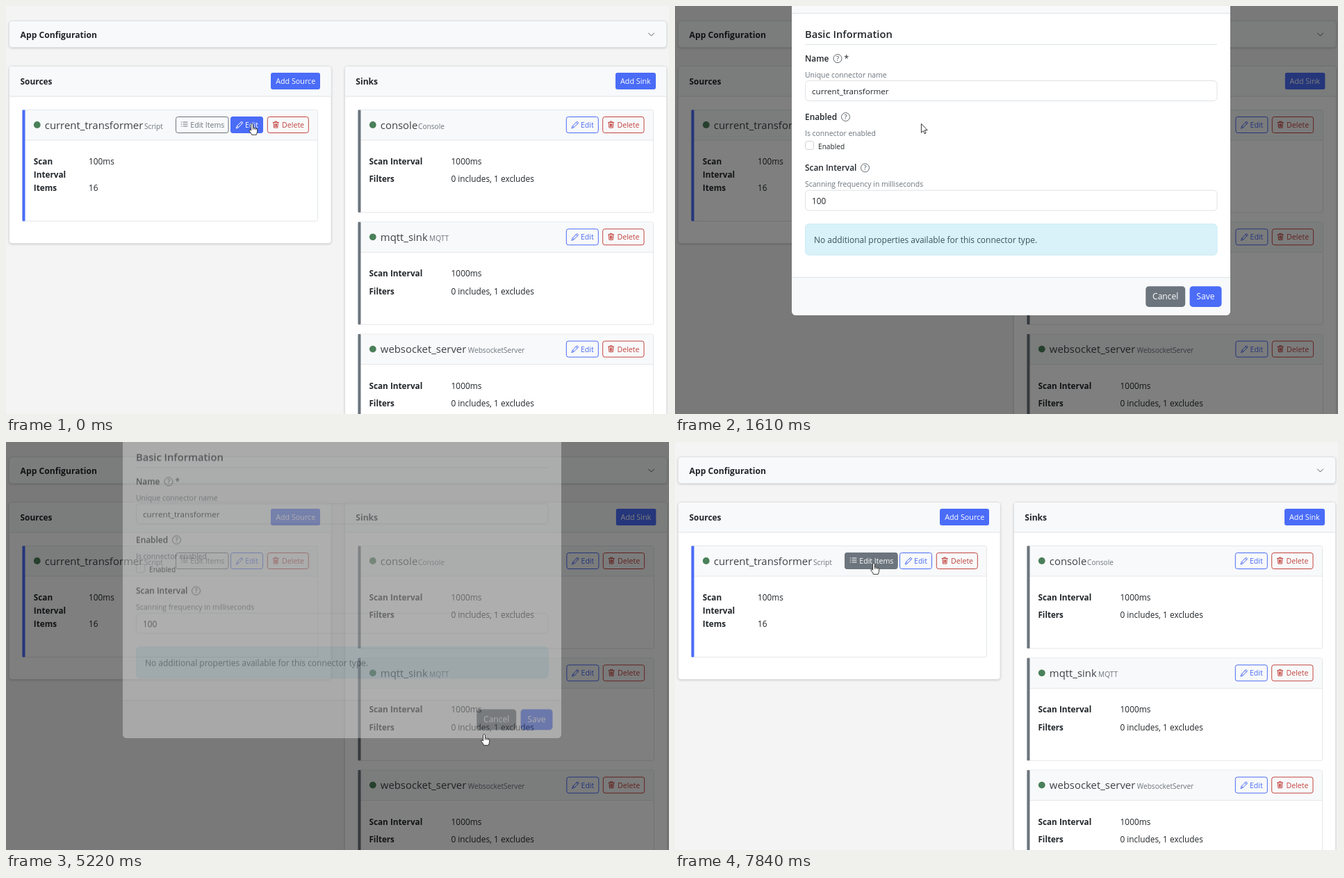
An HTML page for the animation above (8000 ms loop, 954 by 587 pixels).

```html
<!DOCTYPE html>
<html lang="en">
<head>
<meta charset="utf-8">
<title>Connector settings</title>
<style>
html, body { margin: 0; width: 100%; height: 100%; overflow: hidden; background: #f4f4f4; }
svg { display: block; width: 954px; height: 587px; font-family: "Open Sans", "Noto Sans", sans-serif; }
text { fill: #212529; }
.b { font-weight: 700; }
.sb { font-weight: 600; }
.title { font-weight: 500; fill: #3d4246; }
.mute { fill: #6c757d; }
.white { fill: #fff; }
.shadow { filter: drop-shadow(0 1.5px 1.5px rgba(0, 0, 0, .16)); }
.line { fill: none; stroke-width: 1; stroke-linecap: round; stroke-linejoin: round; }

/* every change is held until the next one */
.wide, .nudge, #shade, #modal, #editOn, #itemsOn, #cancelOn, #spin, #cursor, #arrow, #hand {
  animation: 8s step-end infinite;
}
.wide { width: var(--w); animation-name: wide; }
.nudge { animation-name: nudge; }
#shade { animation-name: shade; }
#modal { animation-name: modal; }
#editOn { animation-name: edit; }
#itemsOn { animation-name: items; }
#cancelOn { animation-name: cancel; }
#spin { animation-name: spin; }
#cursor { animation-name: travel; }
#arrow { animation-name: arrow; }
#hand { animation-name: hand; }

@keyframes wide {
  0%, 70.3%, 100% { width: var(--w); }
  14.9% { width: calc(var(--w) + .8px); }
}
@keyframes nudge {
  0%, 70.3%, 100% { transform: none; }
  14.9% { transform: translateX(.6px); }
}
@keyframes shade {
  0%, 70.3%, 100% { opacity: 0; }
  14.9% { opacity: .2; }
  17.6% { opacity: .5; }
  67.7% { opacity: .025; }
}
@keyframes modal {
  0%, 67.7%, 100% { opacity: 0; transform: translateY(-40px); }
  17.6% { opacity: .74; transform: translateY(-18.7px); }
  20.1% { opacity: 1; transform: none; }
  65.2% { opacity: .37; transform: translateY(-18.7px); }
}
@keyframes edit {
  0% { opacity: 1; filter: none; }
  12.5% { opacity: 1; filter: brightness(.9); }
  14.9% { opacity: .6; filter: none; }
  17.6%, 100% { opacity: 0; filter: none; }
}
@keyframes items {
  0% { opacity: 0; }
  92.9%, 100% { opacity: 1; }
}
@keyframes cancel {
  0%, 65.2%, 100% { opacity: 0; }
  52.7% { opacity: .6; }
  55.2% { opacity: 1; }
}
@keyframes spin {
  0%, 45.1%, 100% { opacity: 0; }
  30.1% { opacity: 1; }
}
@keyframes travel {
  0% { transform: translate(354px, 169px); }
  22.6% { transform: translate(450px, 181px); }
  25.1% { transform: translate(544px, 193px); }
  27.6% { transform: translate(563px, 210px); }
  30.1% { transform: translate(578px, 224px); }
  37.6% { transform: translate(600px, 238px); }
  40.1% { transform: translate(613px, 258px); }
  42.6% { transform: translate(630px, 285px); }
  45.1% { transform: translate(650px, 322px); }
  47.6% { transform: translate(668px, 358px); }
  50.1% { transform: translate(682px, 385px); }
  52.7% { transform: translate(685px, 405px); }
  55.2% { transform: translate(687px, 415px); }
  57.7% { transform: translate(688px, 420px); }
  75.3% { transform: translate(650px, 400px); }
  77.8% { transform: translate(570px, 358px); }
  80.4% { transform: translate(480px, 308px); }
  82.9% { transform: translate(400px, 261px); }
  85.4% { transform: translate(335px, 221px); }
  87.9% { transform: translate(300px, 199px); }
  90.4% { transform: translate(292px, 186px); }
  92.9% { transform: translate(288px, 178px); }
  95.4%, 100% { transform: translate(286px, 174px); }
}
@keyframes arrow {
  0%, 52.7%, 92.9%, 100% { opacity: 0; }
  14.9%, 75.3% { opacity: 1; }
}
@keyframes hand {
  0%, 52.7%, 92.9%, 100% { opacity: 1; }
  14.9%, 75.3% { opacity: 0; }
}
</style>
</head>
<body>
<svg id="stage" viewBox="0 0 954 587"></svg>
<script>
const BLUE = '#4a6cf7', GRAY = '#6c757d', RED = '#c2453f', PALE = '#f8f9fa', EDGE = '#dfe1e3';

const text = (x, y, s, size, cls = '') =>
  `<text x="${x}" y="${y}" font-size="${size}" class="${cls}">${s}</text>`;

const rect = (x, y, w, h, fill, stroke = 'none', r = 0, cls = '') =>
  `<rect x="${x}" y="${y}" width="${w}" height="${h}" rx="${r}" fill="${fill}" stroke="${stroke}"
    class="${cls}" style="--w:${w}px"/>`;

const path = (d, colour, extra = '') =>
  `<path class="line" d="${d}" stroke="${colour}" ${extra}/>`;

const icons = {
  list: 'M.7 1.5h.6M.7 4.5h.6M.7 7.5h.6M3.5 1.5h6M3.5 4.5h6M3.5 7.5h6',
  pencil: 'M.6 10.2L1.8 7 8.2.6 10.2 2.6 3.8 9ZM6.8 2L8.8 4M1.8 7L3.8 9',
  trash: 'M.6 2h8.2M3.2 1.8V.6h3V1.8M1.5 2.2L2 9.6H7.4L7.9 2.2M3.5 4V8M4.7 4V8M5.9 4V8'
};

// Small outlined button, or filled when `on` is set
function button(x, w, y, label, icon, colour, on = false) {
  const ink = on ? '#fff' : colour;
  const gap = icon === 'list' ? 7 : 7.2;
  return rect(x, y, w, 23, on ? colour : 'none', colour, 3) +
    `<g transform="translate(${x + gap} ${y + 6})">${path(icons[icon], ink)}</g>` +
    `<text x="${x + (icon === 'pencil' ? 20.6 : 20.8)}" y="${y + 15.6}" font-size="10.6" style="fill:${ink}">${label}</text>`;
}

const solid = (x, y, w, h, label, size, pad, fill, r) =>
  rect(x, y, w, h, fill, 'none', r) + text(x + pad, y + h / 2 + size * .36, label, size, 'white');

// Connector card: accent bar, pale heading strip, dot and names
function card(x, y, h, accent, name, kind, kindX, cls) {
  return rect(x, y, 425, h, '#fff', '#e4e6e8', 2, cls) +
    rect(x + .5, y + .5, 424, 42.5, PALE, 'none', 0, cls) +
    rect(x + .5, y + 43, 424, 1, '#e4e6e8', 'none', 0, cls) +
    rect(x, y, 4, h, accent, 'none', 1) +
    `<circle cx="${x + 21.3}" cy="${y + 21.5}" r="4.9" fill="#4a8059"/>` +
    text(x + 32.3, y + 27.3, name, 14.9, 'title') +
    text(kindX, y + 27.3, kind, 10.15, 'mute');
}

function panel(x, y, w, h, cls = '') {
  return `<g class="shadow">${rect(x, y, w, h, '#fff', EDGE, 4, cls)}</g>` +
    rect(x + .5, y + .5, w - 1, 43, PALE, 'none', 3.5, cls) +
    rect(x + .5, y + 43, w - 1, 1, EDGE, 'none', 0, cls);
}

function sink(i, name, kind, kindX) {
  const x = 506.5, y = 149.5 + i * 161.3;
  return card(x, y, 147.5, GRAY, name, kind, kindX, 'wide') +
    `<g class="nudge">${button(806.3, 46, y + 10, 'Edit', 'pencil', BLUE)}
     ${button(858.7, 59.3, y + 10, 'Delete', 'trash', RED)}</g>` +
    text(522.5, y + 78.4, 'Scan Interval', 11.75, 'b') + text(640.6, y + 78.4, '1000ms', 11.85) +
    text(522.5, y + 103.8, 'Filters', 11.6, 'b') + text(640.4, y + 103.8, '0 includes, 1 excludes', 11.88);
}

const page =
  `<g class="shadow">${rect(4.5, 21.5, 946, 38, PALE, EDGE, 4, 'wide')}</g>` +
  text(20.6, 45.8, 'App Configuration', 12.15, 'b') +
  path('M924.5 39L928.5 43 932.5 39', '#555b60') +

  panel(4.5, 86.5, 463.5, 255) +
  text(20.5, 113, 'Sources', 11.9, 'b') +
  solid(381, 96, 71, 24, 'Add Source', 10.75, 7.2, BLUE, 3) +
  card(23.5, 149.5, 160, BLUE, 'current_transformer', 'Script', 199) +
  button(244.5, 75.5, 159.5, 'Edit Items', 'list', GRAY) +
  button(323.5, 46, 159.5, 'Edit', 'pencil', BLUE) +
  button(376.3, 59, 159.5, 'Delete', 'trash', RED) +
  `<g id="editOn">${button(323.5, 46, 159.5, 'Edit', 'pencil', BLUE, true)}</g>` +
  `<g id="itemsOn">${button(244.5, 75.5, 159.5, 'Edit Items', 'list', GRAY, true)}</g>` +
  text(39.8, 228, 'Scan', 11.75, 'b') + text(39.8, 247, 'Interval', 11.75, 'b') +
  text(39.8, 266, 'Items', 11.75, 'b') +
  text(119, 228, '100ms', 11.8) + text(119, 266, '16', 11.8) +

  panel(487.5, 86.5, 463, 520, 'wide') +
  text(503.3, 113, 'Sinks', 12.1, 'b') +
  `<g class="nudge">${solid(877, 96, 58, 24, 'Add Sink', 10.75, 7, BLUE, 3)}</g>` +
  sink(0, 'console', 'Console', 593) +
  sink(1, 'mqtt_sink', 'MQTT', 609) +
  sink(2, 'websocket_server', 'WebsocketServer', 664.8);

// Field heading with help mark and hint
function field(y, label, markX, hint) {
  return text(187, y, label, 11.9, 'sb') +
    `<circle cx="${markX}" cy="${y - 4.4}" r="6" fill="none" stroke="#5f666c"/>` +
    `<text x="${markX}" y="${y - 1}" font-size="9.2" text-anchor="middle" class="mute sb">?</text>` +
    text(187, y + 23.2, hint, 10.45, 'mute');
}

const box = y => rect(187.5, y, 592.5, 29, '#fff', '#dee2e6', 5);

const modal =
  rect(168, -60, 631, 505, '#fff', 'none', 6) +
  rect(168, -60, 631, 70.5, PALE) + rect(168, 10, 631, 1, '#dee2e6') +
  text(187, 45.6, 'Basic Information', 14.7, 'sb') + rect(187, 55, 593, 1, '#dee2e6') +
  field(80, 'Name', 234, 'Unique connector name') + text(243.6, 80.4, '*', 11.9) +
  box(107.5) + text(197, 127.2, 'current_transformer', 11.65) +
  field(164, 'Enabled', 245.5, 'Is connector enabled') +
  rect(187.5, 194.5, 12, 12, '#fff', '#cdd1d5', 3) + text(206, 206, 'Enabled', 10.15) +
  field(237.2, 'Scan Interval', 273.5, 'Scanning frequency in milliseconds') +
  box(265.2) + text(197, 284.8, '100', 11.75) +
  `<path id="spin" d="M761 277L764.5 271.8 768 277ZM761 282.8H768L764.5 288Z" fill="#70757a"/>` +
  rect(187.5, 313.7, 592.5, 44.6, '#d9f1f9', '#cbecf6', 5) +
  text(200, 341.2, 'No additional properties available for this connector type.', 11.98)
    .replace('<text', '<text style="fill:#3a525c"') +
  `<path d="M168 390.5H799V439a6 6 0 0 1-6 6H174a6 6 0 0 1-6-6Z" fill="${PALE}"/>` +
  rect(168, 390, 631, 1, '#dee2e6') +
  solid(677.3, 403.3, 56.9, 29.6, 'Cancel', 12.1, 9.7, GRAY, 4.5) +
  `<g id="cancelOn">${solid(677.3, 403.3, 56.9, 29.6, 'Cancel', 12.1, 9.7, '#5c636a', 4.5)}</g>` +
  solid(740.6, 403.3, 45.9, 29.6, 'Save', 12.15, 9.7, BLUE, 4.5);

const cursor =
  `<path id="arrow" d="M.4.4V13.2L3.3 10.5 5.2 14.8 7.1 14 5.2 9.7H9.2Z"/>` +
  `<path id="hand" d="M-1.4 1.3Q0-.7 1.4 1.3V6.2Q2.6 5.3 3.5 6.6 4.8 5.8 5.6 7.1 7.4 6.7 7.6 8.4V11.6
    Q7.4 13.6 6.2 16.3H-.5Q-1.2 14-3.6 11.3-4.6 9.5-3.4 9-2.4 8.8-1.4 10.2Z
    M1.4 6.2V8.6M3.5 6.6V8.8M5.6 7.1V9"/>`;

document.getElementById('stage').innerHTML =
  rect(0, 0, 954, 587, '#f4f4f4') + page +
  '<rect id="shade" width="954" height="587"/>' +
  `<g id="modal">${modal}</g>` +
  `<g id="cursor" fill="#fff" stroke="#222" stroke-width=".9" stroke-linejoin="round">${cursor}</g>`;
</script>
</body>
</html>
```
